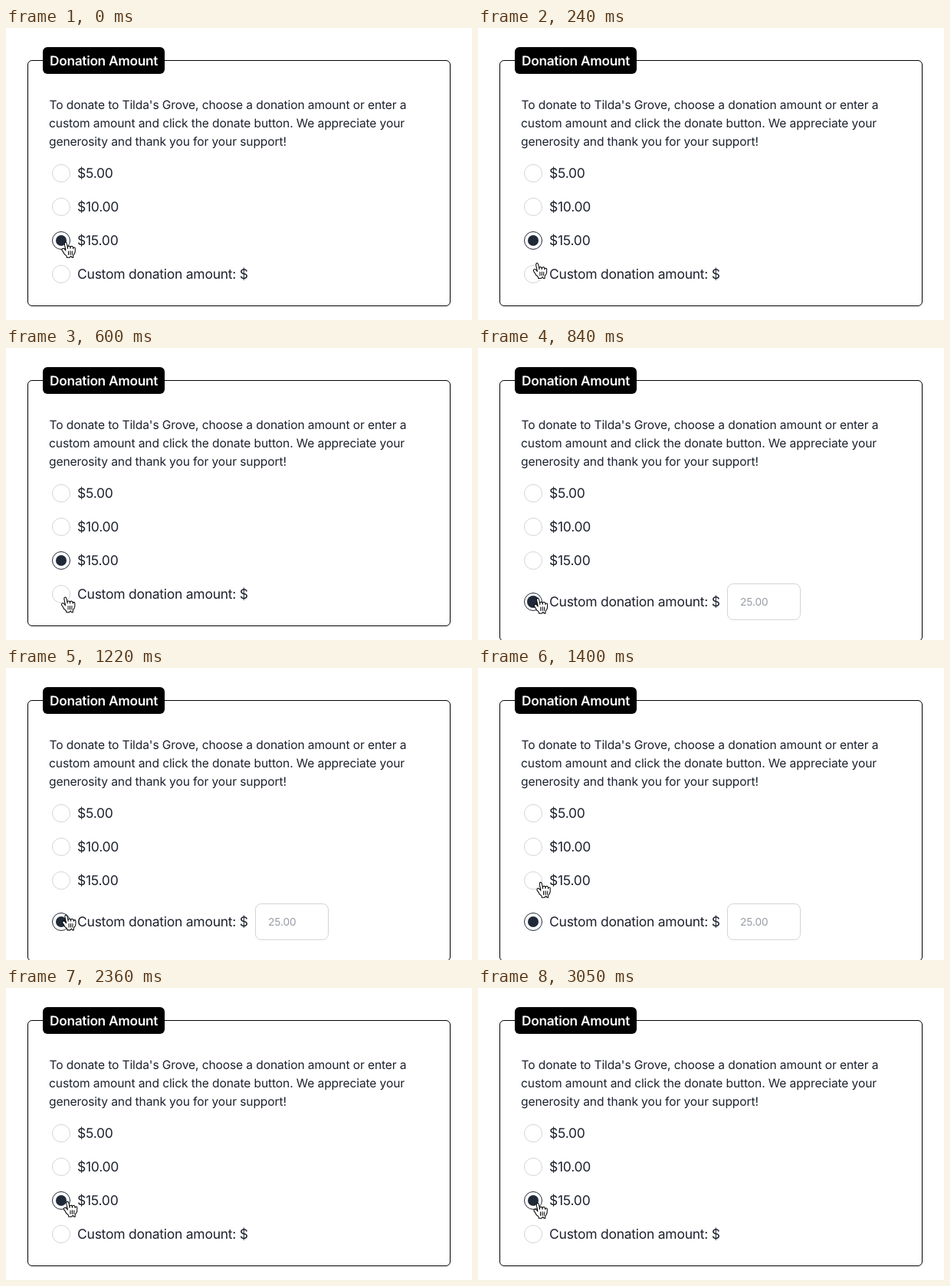
Recreate the animation shown at these times as an HTML page. Size 608 px wide and 382 px high, loop 3080 ms.

```html
<!DOCTYPE html>
<html lang="en">
<head>
<meta charset="utf-8">
<title>Donation Amount</title>
<style>
  html, body { margin: 0; width: 100%; height: 100%; overflow: hidden; background: #fff; }
  svg { display: block; font-family: Inter, "Liberation Sans", sans-serif; text-rendering: geometricPrecision; }
  text { fill: #1c212d; }
  .title { font-size: 17.3px; font-weight: 600; letter-spacing: -.29px; fill: #fff; }
  .para { font-size: 15.6px; letter-spacing: -.12px; }
  .label { font-size: 17.5px; letter-spacing: -.25px; }
  .hint { font-size: 13.7px; letter-spacing: -.1px; fill: #999da5; }
  .ring { fill: #fff; stroke: #d2d4d7; }
  .on .ring { stroke: #1f2937; }
  .dot { fill: #1f2937; }
</style>
</head>
<body>
<svg width="608" height="382" viewBox="0 0 608 382">
  <rect id="box" x="28.5" y="42.5" width="551" height="321" rx="5.5" fill="none" stroke="#000"/>
  <rect x="48" y="25" width="159" height="35" rx="6"/>
  <text class="title" x="57" y="49">Donation Amount</text>
  <g class="para">
    <text x="56.5" y="106">To donate to Tilda's Grove, choose a donation amount or enter a</text>
    <text x="56" y="130">custom amount and click the donate button. We appreciate your</text>
    <text x="56" y="154">generosity and thank you for your support!</text>
  </g>
  <g id="rows"></g>
  <g id="field">
    <rect x="325.5" y="308.5" width="95" height="47" rx="7.5" fill="#fff" stroke="#d2d4d7"/>
    <text class="hint" x="342" y="337">25.00</text>
  </g>
  <g id="hand" fill="#fff" stroke="#000" stroke-width=".85" stroke-linejoin="round" stroke-linecap="round">
    <path d="M11.3 20.4c-.3-.4-.6-1.1-1.2-2-.3-.5-1.2-1.5-1.5-1.9-.2-.4-.2-.6-.1-1 .1-.6.7-1.1 1.4-1.1.5 0 1 .4 1.4.7.2.2.5.6.7.8.2.2.2.3.4.5.2.3.3.5.2.1-.1-.5-.2-1.3-.4-2.1-.1-.6-.2-.7-.3-1.1-.1-.5-.2-.8-.3-1.3-.1-.3-.2-1.1-.3-1.5-.1-.5-.1-1.4.3-1.8.3-.3.9-.4 1.3-.2.5.3.8 1 .9 1.3.2.5.4 1.2.5 2 .2 1 .5 2.5.5 2.8 0-.4-.1-1.1 0-1.5.1-.3.3-.7.7-.8.3-.1.6-.1.9-.1.3.1.6.3.8.5.4.6.4 1.9.4 1.8.1-.4.1-1.2.3-1.6.1-.2.5-.4.7-.5.3-.1.7-.1 1 0 .2 0 .6.3.7.5.2.3.3 1.3.4 1.7 0 .1.1-.4.3-.7.4-.6 1.8-.8 1.9.6v1.1 1.2c0 .4-.1 1.3-.2 1.7-.1.3-.4 1-.7 1.4 0 0-1.1 1.2-1.2 1.8-.1.6-.1.6-.1 1s.1.9.1.9-.8.1-1.2 0-.9-.8-1-1.1c-.2-.3-.5-.3-.7 0-.2.4-.7 1.1-1.1 1.1-.7.1-2.1 0-3.1 0 0 0 .2-1-.2-1.4-.3-.3-.8-.8-1.1-1.1z"/>
    <path d="M19.6 20.7v-3.4M17.6 20.7v-3.5M15.6 17.3v3.4"/>
  </g>
</svg>
<script>
const LOOP = 3080;
const OPEN = 710, CLOSE = 1680;           // amount field shown
const PICK = 740, REPICK = 1690;          // radio switches
const STALL = 840, RESUME = 1180;         // the picture stands still between these
// time, x, y of the hand
const path = [
  [20, 72.5, 280], [400, 71.5, 324], [540, 72, 325.5], [580, 72, 325.5], [700, 72.8, 327],
  [1180, 72.8, 327], [1400, 76.5, 280], [1560, 75, 279],
  [2500, 75, 279], [2700, 72.5, 280]
];

const $ = id => document.getElementById(id);
const ease = p => p * p * (3 - 2 * p);
const mix = (a, b, p) => a + (b - a) * p;

$('rows').innerHTML = ['$5.00', '$10.00', '$15.00', 'Custom donation amount: $'].map((label, i) => {
  const y = 190 + 44 * i;
  return `<g><circle class="ring" cx="72" cy="${y}" r="11.5"/><circle class="dot" cx="72" cy="${y}" r="0"/>
    <text class="label" x="93" y="${y + 6}">${label}</text></g>`;
}).join('');
const [, , fifteen, custom] = $('rows').children;

// The dot swells past its size, then settles
function dotSize(age) {
  const p = age / 100;
  const inset = p < 1 ? mix(12, 3, ease(p)) : mix(3, 4, ease(Math.min(p - 1, 1)));
  return Math.max(0, 11 - inset);
}

function setRadio(row, on, age) {
  row.classList.toggle('on', on);
  row.querySelector('.dot').setAttribute('r', on ? dotSize(age) : 0);
}

function handAt(t) {
  if (t >= 3050) return [72.5, 281];
  if (t <= path[0][0]) return path[0].slice(1);
  const i = path.findIndex(k => k[0] > t);
  if (i < 0) return path[path.length - 1].slice(1);
  const [t0, x0, y0] = path[i - 1], [t1, x1, y1] = path[i];
  const p = ease((t - t0) / (t1 - t0));
  return [mix(x0, x1, p), mix(y0, y1, p)];
}

function draw(t) {
  if (t > STALL && t < RESUME) t = STALL;
  const open = t >= OPEN && t < CLOSE;
  const picked = t >= PICK && t < REPICK;
  $('box').setAttribute('height', open ? 341 : 321);
  $('field').setAttribute('visibility', open ? 'visible' : 'hidden');
  custom.setAttribute('transform', `translate(0 ${open ? 10 : 0})`);
  setRadio(custom, picked, t - PICK);
  setRadio(fifteen, !picked, t < PICK ? LOOP : t - REPICK);
  const [x, y] = handAt(t);
  $('hand').setAttribute('transform', `translate(${x} ${y}) scale(1.2 1.3) translate(-8.1 -8.1)`);
}

const start = performance.now();
function tick() {
  draw((performance.now() - start) % LOOP);
  requestAnimationFrame(tick);
}
tick();
</script>
</body>
</html>
```
